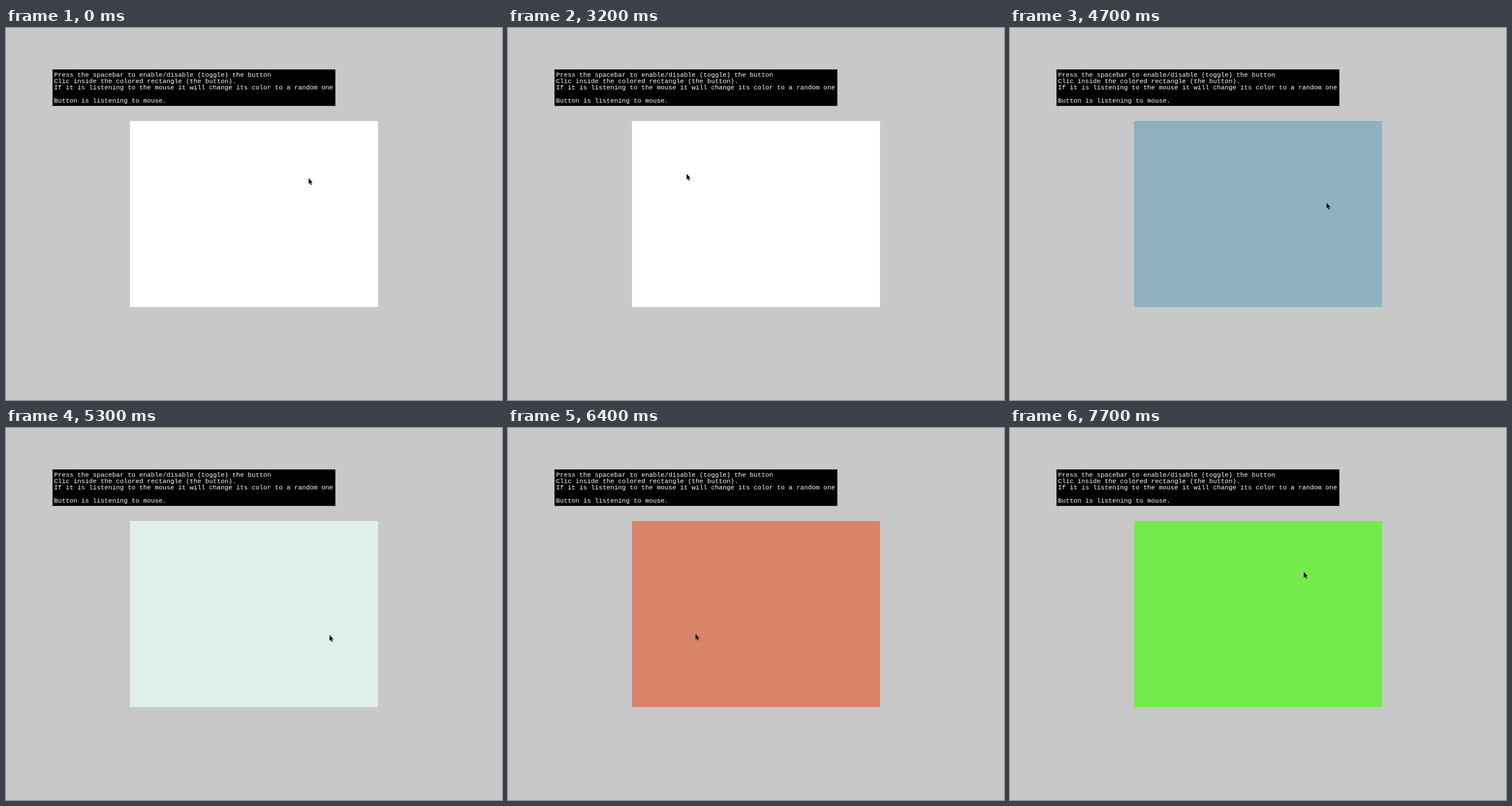
Recreate the animation shown at these times as an HTML page. Size 864 px wide and 648 px high, loop 8000 ms.

```html
<!DOCTYPE html>
<html lang="en">
<head>
<meta charset="utf-8">
<title>Toggle button</title>
<style>
  html, body { margin: 0; width: 100%; height: 100%; overflow: hidden; background: #c8c8c8; }
  svg { display: block; width: 864px; height: 648px; }
  text { font: 11.25px "Liberation Mono", "DejaVu Sans Mono", monospace; fill: #fff; white-space: pre; }
</style>
</head>
<body>
<svg viewBox="0 0 864 648">
  <rect x="81" y="72.2" width="492.7" height="63.5"/>
  <g id="lines"></g>
  <rect id="button" x="216" y="162" width="432" height="324" fill="#fff"/>
  <g id="cursor">
    <path d="M1 1.6V12L3.2 10.2 4.9 13.7 6.5 13 5.2 9.5H8.2Z" fill="#000" opacity=".2"/>
    <path d="M.2 .6V10.5L2.4 8.6 4 12.3 5.6 11.6 4 8H6.8Z"
          fill="#000" stroke="#fff" stroke-opacity=".55" stroke-width=".8" paint-order="stroke"/>
  </g>
</svg>
<script>
const LOOP = 8000, STEP = 100, LINE = 11.45;

const lines = [
  "Press the spacebar to enable/disable (toggle) the button",
  "Clic inside the colored rectangle (the button).",
  "If it is listening to the mouse it will change its color to a random one",
  "",
  "Button is listening to mouse."
];

// Each trip leaves after a rest; a click at its start may recolour the button.
const trips = [
  { from: 800, to: 1700, x: 399, y: 262.5 },
  { from: 1700, to: 2300, x: 120, y: 209 },
  { from: 2300, to: 3200, x: 311, y: 253.5 },
  { from: 3400, to: 4100, x: 539, y: 248, color: "#bf8cff" },
  { from: 4400, to: 5000, x: 563.5, y: 360, color: "#8fb0c0" },
  { from: 5300, to: 6000, x: 326.5, y: 358, color: "#dff0e8" },
  { from: 6400, to: 6700, x: 322, y: 262, color: "#d98468" },
  { from: 7000, to: 7700, x: 511.5, y: 250, color: "#73ec4b" }
];

const $ = id => document.getElementById(id);
const mix = (a, b, p) => a + (b - a) * p;
const ease = p => mix(p, p * p * (3 - 2 * p), 0.5);

function poseAt(t) {
  const pose = { x: 527, y: 261, fill: "#ffffff" };
  for (const trip of trips) {
    if (t < trip.from) break;
    const p = ease(Math.min(1, (t - trip.from) / (trip.to - trip.from)));
    pose.x = mix(pose.x, trip.x, p);
    pose.y = mix(pose.y, trip.y, p);
    pose.fill = trip.color || pose.fill;
  }
  return pose;
}

function play(el, frames) {
  el.animate(frames.map(f => ({ ...f, easing: "step-end" })),
    { duration: LOOP, iterations: Infinity }).startTime = 0;
}

lines.forEach((line, i) => {
  const text = document.createElementNS("http://www.w3.org/2000/svg", "text");
  text.setAttribute("x", 83.8);
  text.setAttribute("y", 84.5 + i * LINE);
  text.textContent = line;
  $("lines").append(text);
});

const poses = Array.from({ length: LOOP / STEP + 1 }, (_, i) => poseAt(i * STEP));
play($("cursor"), poses.map(({ x, y }) => ({ transform: `translate(${x}px, ${y}px)` })));
play($("button"), poses.map(({ fill }) => ({ fill })));
</script>
</body>
</html>
```
